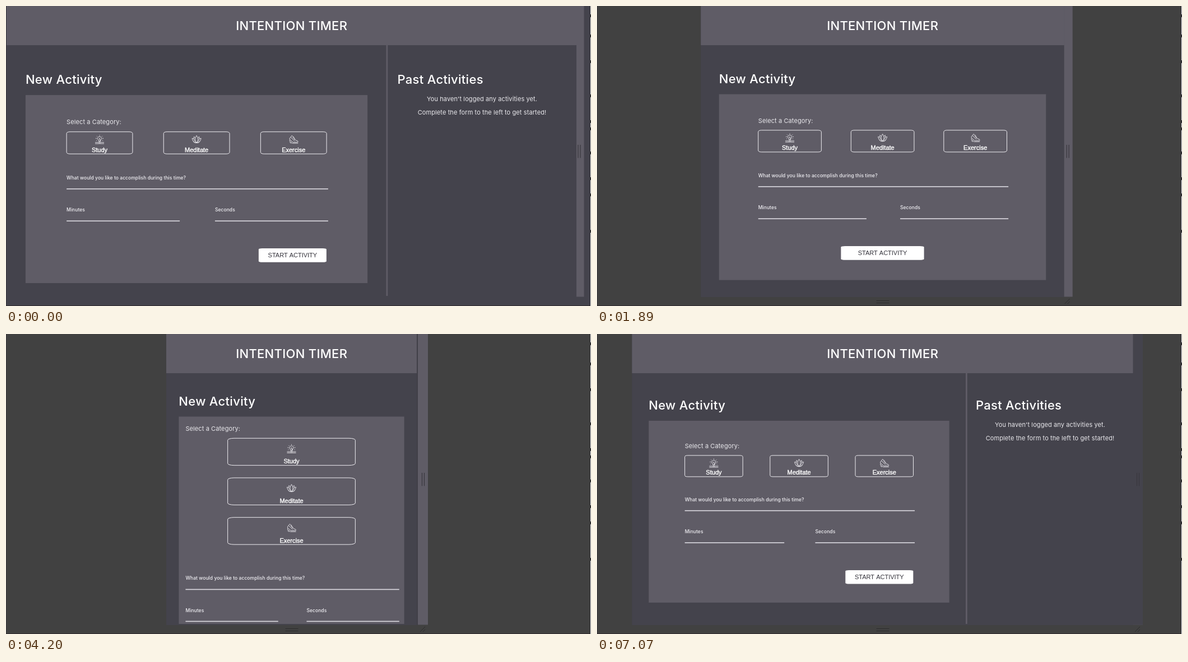
Animation, 1044 px wide and 536 px high, one loop 7.14 s. Source, as an HTML page with a canvas:

```html
<!DOCTYPE html>
<html lang="en">
<head>
<meta charset="utf-8">
<title>Intention Timer</title>
<style>
html, body { margin: 0; width: 100%; height: 100%; overflow: hidden; background: #414141; }
canvas { display: block; }
</style>
</head>
<body>
<canvas id="stage" width="1044" height="536"></canvas>
<script>
const ctx = document.getElementById('stage').getContext('2d');
const LOOP = 7140, STEP = 70;
const DARK = '#44434c', PANEL = '#5f5c66', DESK = '#414141', LINE = '#dddbe2', TEXT = '#f1f0f4';
const SANS = 'Inter, sans-serif', ARIAL = '"Liberation Sans", Arial, sans-serif';
const TABLET = 742, MOBILE = 557;

// time, left edge of the page, how far the page lags behind the resize handle
const KEYS = [
  [0, 1, 4.5], [700, 62, 3.5], [770, 70, 3], [1540, 135, 3], [1890, 185.3, 3],
  [2310, 244, 2], [2870, 305.3, 1], [3080, 316, 0], [3430, 333, 0], [3850, 316, -1],
  [4200, 286, -2], [4620, 234, -2.5], [5180, 165.5, -2.5], [5390, 145, -2.5],
  [6160, 70, -2], [6510, 62, -1], [6720, 62.5, 0.5], [7140, 62.5, 0.5]
];

function poseAt(t) {
  const i = KEYS.findIndex(k => k[0] > t);
  const a = KEYS[i - 1], b = KEYS[i], p = (t - a[0]) / (b[0] - a[0]);
  return [a[1] + (b[1] - a[1]) * p, a[2] + (b[2] - a[2]) * p];
}

function box(x, y, w, h, color) {
  ctx.fillStyle = color;
  ctx.fillRect(x, y, w, h);
}

function label(str, x, y, font, { align = 'left', color = TEXT, spacing = 0, stroke = 0 } = {}) {
  ctx.font = font;
  ctx.textAlign = align;
  ctx.letterSpacing = spacing + 'px';
  ctx.fillStyle = ctx.strokeStyle = color;
  ctx.fillText(str, x, y);
  if (stroke) {
    ctx.lineWidth = stroke;
    ctx.strokeText(str, x, y);
  }
}

const heading = (str, x, y, align) =>
  label(str, x, y, `500 22px ${SANS}`, { align, color: '#fff', spacing: 0.3 });
const note = (str, x, y, align) =>
  label(str, x, y, `400 11px ${SANS}`, { align, color: '#e9e8ec', spacing: 0.1 });

function rounded(x, y, w, h) {
  ctx.beginPath();
  ctx.roundRect(x, y, w, h, { x: w * 0.05, y: h * 0.07 });
}

function strokes(color, width, segments) {
  ctx.strokeStyle = color;
  ctx.lineWidth = width;
  ctx.beginPath();
  for (const [x1, y1, x2, y2] of segments) {
    ctx.moveTo(x1, y1);
    ctx.lineTo(x2, y2);
  }
  ctx.stroke();
}

// Each icon is centred on the origin, about 16 px wide
const CATEGORIES = [
  ['Study', new Path2D('M-1.8 3V1.2C-5-1-3.6-5 0-5S5-1 1.8 1.2V3ZM-1 0L0-2 1 0V3M-1.8 4.5H1.8' +
    'M0-8V-6.5M-5-6L-4-5M5-6L4-5M-7-2H-5.2M7-2H5.2M-6 2L-5 1.2M6 2L5 1.2' +
    'M-8 5.3H-3Q0 7 3 5.3H8M-8 7.5H8')],
  ['Meditate', new Path2D('M0-7Q-5 0 0 6Q5 0 0-7M-2.5-3L-4.5-5Q-6 2 0 6Q6 2 4.5-5L2.5-3' +
    'M-5-1.5L-8-2Q-6.5 6 0 6Q6.5 6 8-2L5-1.5M-6 3.5Q-3 7 0 6Q3 7 6 3.5')],
  ['Exercise', new Path2D('M-7-2L-3-7 0-4Q1 0 4 1.5L7 2.5Q8.5 4 7.5 5H-1L-7 0ZM-7 1L-7 3-2 6.8H8' +
    'M-5-4L2 3M-2-3L0-5M-.5-1.5L1.5-3M1 .2L3-1M-7 5L-4 7')]
];

function categoryButton([name, icon], x, y, w, h, iconY) {
  rounded(x, y, w, h);
  ctx.strokeStyle = '#eeedf1';
  ctx.lineWidth = 1;
  ctx.stroke();
  ctx.save();
  ctx.translate(x + w / 2, y + iconY);
  ctx.lineWidth = 0.9;
  ctx.stroke(icon);
  ctx.restore();
  label(name, x + w / 2, y + h - 3.5, `11px ${ARIAL}`, { align: 'center', color: '#fff', stroke: 0.4 });
}

function field(str, x, textY, lineY, w) {
  label(str, x, textY + 3, `500 8.5px ${SANS}`, { spacing: 0.05 });
  box(x, lineY - 0.8, w, 1.6, LINE);
}

function wideForm(x, top, w, centred) {
  const d = w - 537, inner = x + w * 0.12;
  box(x, top, w, 325 + 0.15 * d, PANEL);
  note('Select a Category:', inner, top + 49 + 0.045 * d);
  CATEGORIES.forEach((c, i) => categoryButton(c, inner + i * w * 0.2837,
    top + 62 + 0.05 * d, w * 0.193, 38 + 0.02 * d, 13.7));
  const y = top + 0.095 * d;
  field('What would you like to accomplish during this time?', inner, y + 141, y + 160.7, w * 0.765);
  field('Minutes', inner, y + 198, y + 218, w * 0.331);
  field('Seconds', x + w * 0.554, y + 198, y + 218, w * 0.331);
  const bw = centred ? w * 0.254 : 121;
  const bx = centred ? x + (w - bw) / 2 : x + w * 0.88 - bw;
  rounded(bx, y + 267, bw, 24.6);
  ctx.fillStyle = '#fff';
  ctx.fill();
  label('START ACTIVITY', bx + bw / 2, y + 283, `11px ${ARIAL}`, { align: 'center', color: '#33323a' });
}

function narrowForm(x, top, w) {
  const e = w - 368, inner = x + w * 0.03, bw = w * 0.566;
  box(x, top, w, 518 - top, PANEL);
  note('Select a Category:', inner, top + 25.6);
  CATEGORIES.forEach((c, i) => categoryButton(c, x + (w - bw) / 2,
    top + 38.7 + i * (69 + 0.05 * e), bw, 46.7 + 0.05 * e, 18 + 0.02 * e));
  const y = top + 0.2 * e;
  field('What would you like to accomplish during this time?', inner, y + 282, y + 302, w * 0.948);
  field('Minutes', inner, y + 339.5, y + 359, w * 0.411);
  field('Seconds', x + w * 0.567, y + 339.5, y + 359, w * 0.411);
}

function page(left, width) {
  const wide = width > TABLET;
  const pad = wide ? width / 30 : width * 0.05;
  const formX = left + pad, top = 125.2 + pad;
  box(left, 0, width, 520, DARK);
  box(left, 0, width, 70, PANEL);
  ctx.save();
  ctx.beginPath();
  ctx.rect(left, 0, width, 518.5);
  ctx.clip();
  heading('New Activity', formX, top - 20);
  if (width > MOBILE) wideForm(formX, top, width * (wide ? 0.6 : 0.9), !wide);
  else narrowForm(formX, top, width * 0.9);
  if (wide) {
    const split = left + width * 2 / 3;
    const middle = (split + 2 + left + width) / 2;
    box(split - 0.5, 70, 2.8, 448, PANEL);
    heading('Past Activities', split + 2.5 + width / 60, top - 20);
    note("You haven't logged any activities yet.", middle, top + 10.5, 'center');
    note('Complete the form to the left to get started!', middle, top + 34.5, 'center');
  }
  ctx.restore();
}

function draw(t) {
  const [left, lag] = poseAt(t);
  const width = 1019 - 2 * left, right = left + width, handle = right - lag;
  const fade = Math.min(1, Math.max(0, (t - 6860) / 210));

  box(0, 0, 1044, 536, t < STEP ? DARK : DESK);
  if (lag < 0) box(right, 0, -lag, 520, '#403f47');
  box(handle, 0, 18, 519.5, PANEL);
  ctx.globalAlpha = fade;
  box(handle, 0, 18, 519.5, DARK);
  ctx.globalAlpha = 1;
  page(left, width);
  if (lag > 0 && !fade) box(right - 1, 0, 2, 70, PANEL);
  heading('INTENTION TIMER', 509.7, 43, 'center');

  strokes('#39383e', 1.2, [7.5, 11.5].map(dx => [handle + dx, 248, handle + dx, 271.5]));
  if (t >= STEP) {
    const edge = handle + 18;
    strokes('#2c2c2d', 1, [
      [498.5, 526.5, 521.5, 526.5], [498.5, 530.5, 521.5, 530.5],
      [edge - 14, 532, edge - 5, 523], [edge - 9, 532, edge - 5, 528]
    ]);
  }

  // window border and the sliver of page behind it
  box(0, 0, 0.6, 536, '#343337');
  box(0, 535, 1043, 1, '#302b2e');
  box(1042, 0, 1, 536, '#29292c');
  box(1043, 0, 1, 536, '#fff');
  for (const y of [18, 54, 100, 161, 207, 220, 263, 309, 338, 403]) box(1043, y - 3, 1, 5, '#333');
}

function tick(now) {
  draw(Math.floor((now % LOOP) / STEP) * STEP);
  requestAnimationFrame(tick);
}
requestAnimationFrame(tick);
</script>
</body>
</html>
```
